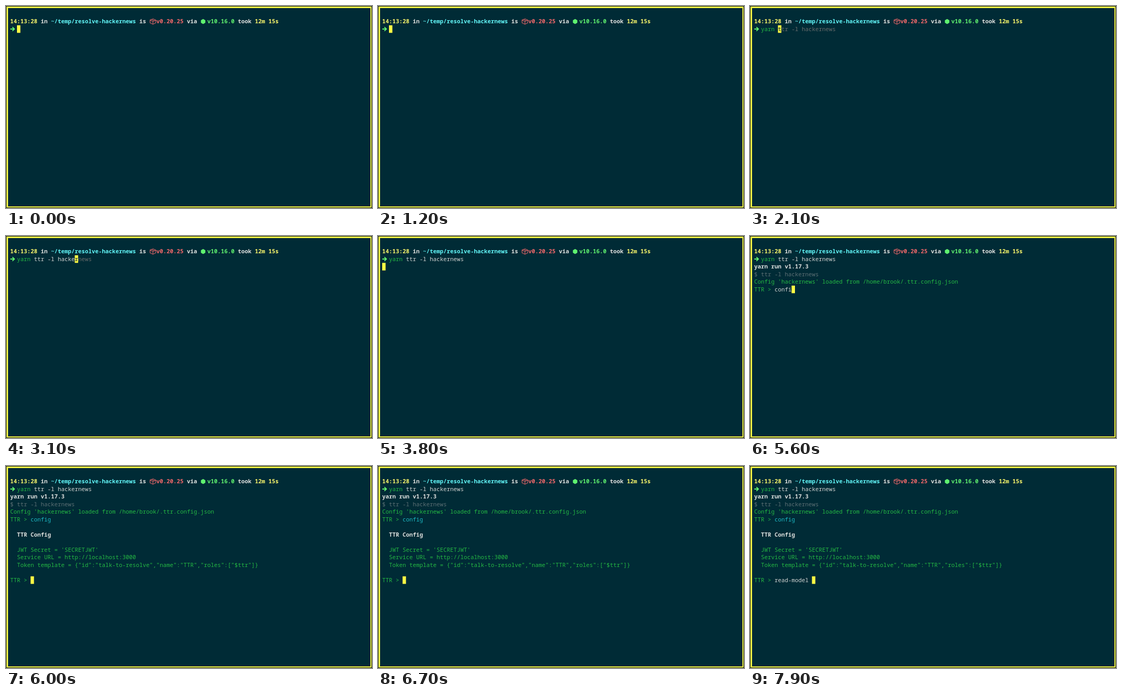
Recreate the animation shown at these times as an HTML page with a canvas. Size 700 px wide and 386 px high, loop 8 s.

```html
<!DOCTYPE html>
<html lang="en">
<head>
<meta charset="utf-8">
<title>Terminal session</title>
<style>
  html, body { margin: 0; width: 100%; height: 100%; overflow: hidden; background: #002b36; }
  canvas { display: block; width: 700px; height: 386px; }
</style>
</head>
<body>
<canvas id="stage" width="700" height="386"></canvas>
<script>
const ctx = document.getElementById("stage").getContext("2d");
const LOOP = 8000;
const LEFT = 8, TOP = 22.3, CELL_W = 6.5, CELL_H = 14.5, BASELINE = 10.7;
const FONT = '10.83px "Noto Sans Mono", "DejaVu Sans Mono", monospace';
const COLOR = {
  back: "#002b36", edge: "#04161c", cursor: "#fdf944", ink: "#08242c",
  text: "#d2d4d2", strong: "#dedfdd", yellow: "#fbf76b", cyan: "#62f6f8",
  red: "#f3686a", lime: "#5ff16f", green: "#24b844", teal: "#1cb9c4",
  hint: "#686c6c", dim: "#5c6f74"
};

const SHELL_LINE = "yarn ttr -l hackernews";
const READ_LINE = "read-model ";
// Pairs of time and number of characters typed so far.
const SHELL_KEYS = [[1400, 0], [1900, 3], [2000, 4], [2800, 16], [2900, 17], [3100, 17], [3600, 22]];
const CONFIG_KEYS = [[5000, 0], [5600, 5], [5700, 6]];
const READ_KEYS = [[6700, 0], [6900, 2], [7000, 2], [7100, 4], [7400, 7], [7500, 7], [7900, 11]];
const ENTER = 3800, YARN_OUT = 4000, PROMPT = 4300, CONFIG_OUT = 6000;

function typed(keys, t) {
  if (t <= keys[0][0]) return keys[0][1];
  for (let i = 1; i < keys.length; i++) {
    const [t0, n0] = keys[i - 1], [t1, n1] = keys[i];
    if (t < t1) return Math.floor(n0 + (n1 - n0) * (t - t0) / (t1 - t0) + 1e-6);
  }
  return keys[keys.length - 1][1];
}

const cellX = col => LEFT + col * CELL_W;
const cellY = row => TOP + row * CELL_H;

function write(row, col, text, color, bold = false) {
  ctx.font = (bold ? "600 " : "400 ") + FONT;
  ctx.fillStyle = color;
  [...text].forEach((ch, i) => {
    if (ch !== " ") ctx.fillText(ch, cellX(col + i), cellY(row) + BASELINE);
  });
}

function cursor(row, col, under = "") {
  ctx.fillStyle = COLOR.cursor;
  ctx.fillRect(cellX(col), cellY(row), CELL_W, CELL_H);
  write(row, col, under, COLOR.ink);
}

function trace(points, close) {
  ctx.beginPath();
  points.forEach(([x, y]) => ctx.lineTo(x, y));
  if (close) ctx.closePath();
}

function stroke(points, color, width, close = false) {
  ctx.strokeStyle = color;
  ctx.lineWidth = width;
  ctx.lineCap = ctx.lineJoin = "round";
  trace(points, close);
  ctx.stroke();
}

function hexagon(x, y, r) {
  return Array.from({ length: 6 }, (_, i) => {
    const a = Math.PI * (i / 3 - 0.5);
    return [x + r * Math.cos(a), y + r * Math.sin(a)];
  });
}

function packageIcon(x, y) {
  const rim = [[x - 5.5, y - 2.6], [x, y - 0.2], [x + 5.5, y - 2.6]];
  stroke([[x, y - 5], rim[2], [x + 5.5, y + 2.7], [x, y + 5.3], [x - 5.5, y + 2.7], rim[0]], COLOR.red, 1, true);
  stroke(rim, COLOR.red, 1);
  stroke([[x, y], [x, y + 5]], COLOR.red, 1);
  stroke([[x - 2.8, y - 3.8], [x + 2.7, y - 1.4]], COLOR.red, 0.9);
}

function frame() {
  ctx.fillStyle = COLOR.edge;
  ctx.fillRect(0, 0, 700, 386);
  ctx.fillStyle = COLOR.cursor;
  ctx.fillRect(1, 1, 698, 384);
  ctx.fillStyle = COLOR.back;
  ctx.fillRect(4, 4, 693, 379);
}

function header() {
  const parts = [
    [0, "14:13:28", COLOR.yellow], [9, "in", COLOR.strong],
    [12, "~/temp/resolve-hackernews", COLOR.cyan], [38, "is", COLOR.strong],
    [43, "v0.20.25", COLOR.red], [52, "via", COLOR.strong],
    [58, "v10.16.0", COLOR.lime], [67, "took", COLOR.strong],
    [72, "12m 15s", COLOR.yellow]
  ];
  parts.forEach(([col, text, color]) => write(0, col, text, color, true));
  packageIcon(281, 29.6);
  ctx.fillStyle = COLOR.lime;
  trace(hexagon(377, 29.6, 4.9), true);
  ctx.fill();
  stroke([[9, 44], [15.6, 44]], COLOR.lime, 2);
  stroke([[12.8, 40.9], [16, 44], [12.8, 47.1]], COLOR.lime, 2);
}

function shellLine(t) {
  const n = typed(SHELL_KEYS, t);
  write(1, 2, SHELL_LINE.slice(0, Math.min(n, 4)), COLOR.green);
  if (n > 4) write(1, 6, SHELL_LINE.slice(4, n), COLOR.text);
  if (t >= ENTER) return;
  if (n > 0) write(1, 3 + n, SHELL_LINE.slice(n + 1), COLOR.hint);
  cursor(1, 2 + n, n > 0 ? SHELL_LINE.charAt(n) : "");
}

function replPrompt(row, text, color, active) {
  write(row, 0, "TTR >", COLOR.green);
  write(row, 6, text, color);
  if (active) cursor(row, 6 + text.length);
}

function yarnOutput(t) {
  if (t >= YARN_OUT) {
    write(2, 0, "yarn run v1.17.3", COLOR.strong, true);
    write(3, 0, "$ ttr -l hackernews", COLOR.dim);
  }
  if (t < PROMPT) {
    cursor(t < YARN_OUT ? 2 : 4, 0);
    return;
  }
  write(4, 0, "Config 'hackernews' loaded from /home/brook/.ttr.config.json", COLOR.green);
  const n = typed(CONFIG_KEYS, t);
  replPrompt(5, "config".slice(0, n), n === 6 ? COLOR.teal : COLOR.text, t < CONFIG_OUT);
}

function configOutput(t) {
  write(7, 2, "TTR Config", COLOR.strong, true);
  [
    "JWT Secret = 'SECRETJWT'",
    "Service URL = http://localhost:3000",
    'Token template = {"id":"talk-to-resolve","name":"TTR","roles":["$ttr"]}'
  ].forEach((line, i) => write(9 + i, 2, line, COLOR.green));
  replPrompt(13, READ_LINE.slice(0, typed(READ_KEYS, t)), COLOR.text, true);
}

function draw() {
  const t = performance.now() % LOOP;
  frame();
  header();
  shellLine(t);
  if (t >= ENTER) yarnOutput(t);
  if (t >= CONFIG_OUT) configOutput(t);
  requestAnimationFrame(draw);
}
draw();
</script>
</body>
</html>
```
